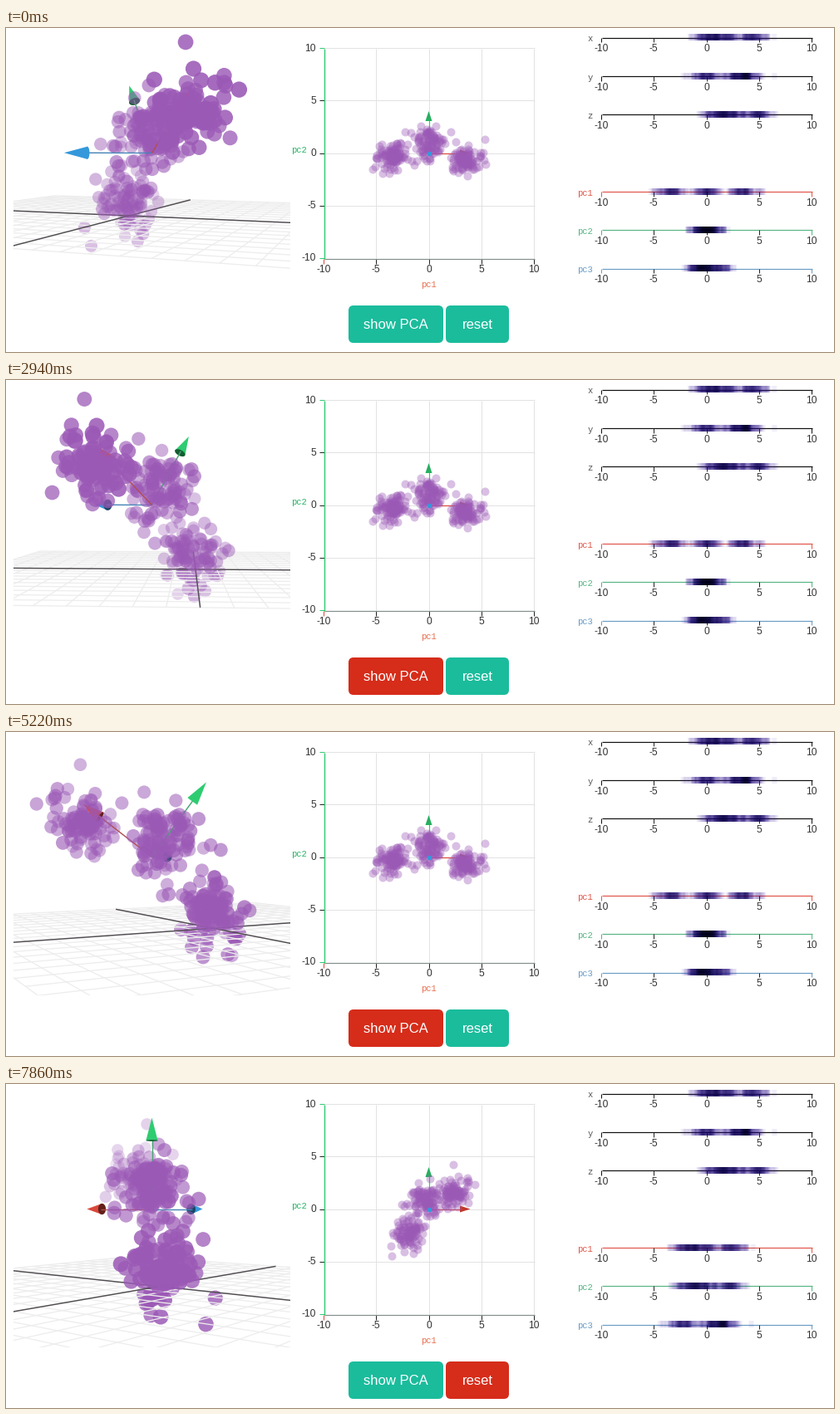
Write a matplotlib script that moves like this. It is 996 by 390 pixels and loops after 8 s.

```python
import numpy as np
import matplotlib.pyplot as plt
from matplotlib.animation import FuncAnimation
from matplotlib.collections import LineCollection
from matplotlib.colors import to_rgb
from matplotlib.patches import FancyBboxPatch, Polygon

W, H, DPI = 996, 390, 100
FRAMES, INTERVAL = 100, 80
PX = 72 / DPI
PURPLE = "#9b59b6"
RED, GREEN, BLUE = AXIS_COLOURS = "#d9483b", "#2ecc71", "#3498db"
TEAL, HOVER = "#1abc9c", "#d62c1a"

# Perspective view: eye level with the cloud's mean, orbiting around it
CX, CY, FOCAL, DIST = 175.5, 150.5, 687, 25
FLOOR = np.array([-1.92, -3.02, -1.93])
MEAN = np.array([2.0, 2.2, 2.7])


def orthonormal(basis):
    a = basis[0] / np.linalg.norm(basis[0])
    b = basis[1] - a * (a @ basis[1])
    b /= np.linalg.norm(b)
    return np.array([a, b, np.cross(a, b)])


PCA = orthonormal(np.array([[.595, .6, .535], [-.44, .805, -.4], [0, 0, 1]]))


def make_cloud(per_cluster=95):
    rng = np.random.default_rng(12)
    parts = []
    for centre in ([-3.5, -.3, 0], [0, .95, 0], [3.5, -.65, 0]):
        p = rng.normal(0, .74, (per_cluster, 3))
        parts.append(p - p.mean(axis=0) + centre)
    return np.vstack(parts) @ PCA


CLOUD = make_cloud()

fig = plt.figure(figsize=(W / DPI, H / DPI), dpi=DPI, facecolor="white")


def pixel_axes(x0, y0, x1, y1):
    ax = fig.add_axes([x0 / W, 1 - y1 / H, (x1 - x0) / W, (y1 - y0) / H])
    ax.set_xlim(x0, x1)
    ax.set_ylim(y1, y0)
    ax.autoscale(False)
    ax.axis("off")
    return ax


page = pixel_axes(0, 0, W, H)
view = pixel_axes(9, 0, 342, 317)


def line(ax, xs, ys, colour, width=1, z=2):
    return ax.plot(xs, ys, color=colour, lw=width * PX, zorder=z,
                   solid_capstyle="butt")[0]


def label(x, y, text, size=12, colour="#333333", family="Liberation Sans",
          ha="center"):
    return page.text(x, y, text, fontsize=size * PX, color=colour,
                     family=family, ha=ha, va="center", zorder=9)


def name_label(x, y, text, colour, ha="center"):
    label(x, y, text, 10.5, colour, "Liberation Mono", ha)


# ---- scatter plot -------------------------------------------------------
OX, OY, UNIT = 508.5, 150.5, 12.65


def draw_plot_frame():
    x0, x1, y0, y1 = 382.5, 635.5, 24.5, 277.5
    for v in (-10, -5, 0, 5, 10):
        gx, gy = OX + v * UNIT, OY - v * UNIT
        if v > -10:
            line(page, [gx, gx], [y0, y1], "#e2e2e2", z=1)
            line(page, [x0, x1], [gy, gy], "#e2e2e2", z=1)
        line(page, [gx, gx], [y1, y1 + 6], RED if v == -10 else "#222222")
        line(page, [x0 - 6, x0], [gy, gy],
             GREEN if abs(v) == 10 else "#222222")
        label(gx, 291.5, str(v))
        label(373, gy + .5, str(v), ha="right")
    line(page, [x0, x1], [y1, y1], "#83908a", 1.2)
    line(page, [x0, x0], [y0, y1], GREEN, 1.4)
    name_label(508.5, 308.5, "pc1", "#e8704f")
    name_label(352, 147.5, "pc2", "#27b768")
    line(page, [OX, OX], [OY, OY - 40], GREEN, 1.2, 3)
    line(page, [OX, OX + 40], [OY, OY], RED, 1.2, 3)
    page.add_patch(Polygon([(OX, 100), (OX - 4, 112), (OX + 4, 112)],
                           fc="#27ae60", lw=0, zorder=3))
    page.add_patch(Polygon([(558.5, OY), (546, OY - 4), (546, OY + 4)],
                           fc="#c0392b", lw=0, zorder=3))
    page.scatter([OX], [OY], s=(5.5 * PX) ** 2, color=BLUE, lw=0, zorder=5)


draw_plot_frame()
dots = page.scatter(*np.zeros((2, len(CLOUD))), s=(10 * PX) ** 2, color=PURPLE,
                    alpha=.38, lw=0, zorder=4)

# ---- density strips -----------------------------------------------------
SX, SC = 716.5, 842.5
STRIP_X = np.linspace(-10, 10, 254)


def density_rgba(values):
    gap = np.abs(STRIP_X[:, None] - values[None, :])
    count = np.clip((.32 - gap) / .16, 0, 1).sum(axis=1)
    rgb = np.exp(-count[:, None] * np.array([.062, .074, .030]))
    alpha = 1 - rgb.min(axis=1)
    safe = np.maximum(alpha, 1e-6)[:, None]
    ink = np.clip((rgb - 1 + safe) / safe, 0, 1)
    return np.column_stack([ink, alpha])[None]


def draw_strip(y, text, colour, text_colour, values):
    line(page, [SX, SX + 253], [y, y], colour, 1.2)
    for v in (-10, -5, 0, 5, 10):
        tx = SC + v * UNIT
        line(page, [tx, tx], [y, y + 5.5],
             colour if abs(v) == 10 else "#222222")
        label(tx, y + 14, str(v))
    name_label(706, y + 2, text, text_colour, "right")
    return page.imshow(density_rgba(values), aspect="auto", zorder=3,
                       extent=(716, 970, y + 4, y - 4),
                       interpolation="nearest")


for y, text, values in zip((11.5, 58, 104), "xyz", (CLOUD + MEAN).T):
    draw_strip(y, text, "#111111", "#555555", values)
strips = [draw_strip(y, text, colour, colour, CLOUD[:, 0])
          for y, text, colour in zip((197, 243, 289.5), ("pc1", "pc2", "pc3"),
                                     ("#e0574a", "#55b584", "#6a9cc4"))]


# ---- buttons ------------------------------------------------------------
def draw_button(x0, x1, text):
    box = FancyBboxPatch((x0, 334), x1 - x0, 45, fc=TEAL, lw=0, zorder=2,
                         boxstyle="round,pad=0,rounding_size=6")
    page.add_patch(box)
    label((x0 + x1) / 2, 357, text, 16.6, "white")
    return box


show_button = draw_button(412, 526, "show PCA")
reset_button = draw_button(529, 605, "reset")


# ---- 3D view ------------------------------------------------------------
def project(points, turn):
    x, y, z = np.asarray(points, float).T
    depth = DIST + x * np.cos(turn) - z * np.sin(turn)
    scale = FOCAL / depth
    side = x * np.sin(turn) + z * np.cos(turn)
    return np.column_stack([CX + scale * side, CY - scale * y]), depth


def floor_lines(values, turn):
    segments = []
    for v in values:
        for ends in ([(v, 0, -10), (v, 0, 10)], [(-10, 0, v), (10, 0, v)]):
            segments.append(project(np.array(ends) + FLOOR, turn)[0])
    return segments


def draw_balls(xy, depth, mask, z):
    if not mask.any():
        return
    rgba = np.ones((mask.sum(), 4))
    rgba[:, :3] = to_rgb(PURPLE)
    rgba[:, 3] = np.clip(.56 - .085 * (depth[mask] - DIST), .12, .93)
    view.scatter(*xy[mask].T, s=(408 / depth[mask] * PX) ** 2, c=rgba, lw=0,
                 zorder=z)


def draw_shaft(axis, colour, turn, z):
    xy, _ = project([axis * 0, axis * 3.1], turn)
    mix = .65 * np.array(to_rgb(colour)) + .35 * np.array([.4, .35, .45])
    line(view, *xy.T, mix, 1.4, z)


def draw_head(axis, colour, turn, z):
    helper = np.array([.31, .2, .93]) if abs(axis[1]) > .5 else np.array([0, 1, 0])
    u = np.cross(axis, helper)
    u /= np.linalg.norm(u)
    v = np.cross(axis, u)
    a = np.linspace(0, 2 * np.pi, 28, endpoint=False)[:, None]
    rim, rim_depth = project(axis * 3 + .26 * (np.cos(a) * u + np.sin(a) * v), turn)
    tip, tip_depth = project([axis * 4], turn)
    heading = tip[0] - rim.mean(axis=0)
    across = (rim - rim.mean(axis=0)) @ np.array([-heading[1], heading[0]])
    sides = [tip[0], rim[across.argmax()], rim[across.argmin()]]
    away = tip_depth[0] > rim_depth.mean()
    base = np.array(to_rgb(colour)) * (.45 if away else 1)
    cone = Polygon(sides, fc=colour, lw=0, zorder=z + (0 if away else .1))
    view.add_patch(cone)
    view.add_patch(Polygon(rim, fc=base, lw=0, zorder=z + .05))


def draw_view(basis, turn):
    for artist in [*view.collections, *view.lines, *view.patches]:
        artist.remove()
    xy, depth = project(CLOUD, turn)
    order = np.argsort(-depth)
    xy, depth = xy[order], depth[order]
    above = CLOUD[order, 1] > FLOOR[1]

    draw_balls(xy, depth, ~above, 1)
    grid = [v for v in range(-10, 11) if v]
    view.add_collection(LineCollection(floor_lines(grid, turn), lw=1.3 * PX,
                                       colors="#ededed", zorder=2))
    view.add_collection(LineCollection(floor_lines([0], turn), lw=1.5 * PX,
                                       colors="#524e52", zorder=2.5))

    # Slice the cloud by depth so arrows sit among the balls
    parts = []
    for axis, colour in zip(basis, AXIS_COLOURS):
        for reach, draw in ((1.5, draw_shaft), (3.5, draw_head)):
            part_depth = project([axis * reach], turn)[1][0]
            parts.append((part_depth, draw, axis, colour))
    parts.sort(key=lambda part: -part[0])
    far = np.inf
    for i, (near, draw, axis, colour) in enumerate(parts):
        draw_balls(xy, depth, above & (depth < far) & (depth >= near), 3 + 2 * i)
        draw(axis, colour, turn, 4 + 2 * i)
        far = near
    draw_balls(xy, depth, above & (depth < far), 20)


def ease(t):
    t = min(max(t, 0), 1)
    return 4 * t ** 3 if t < .5 else 1 - 4 * (1 - t) ** 3


def update(i):
    t = i * INTERVAL / 1000
    k = ease((t - 6.35) / 1.0)
    basis = orthonormal(PCA * (1 - k) + np.eye(3) * k)
    draw_view(basis, np.radians(111 + 25.2 * t))

    scores = CLOUD @ basis.T
    dots.set_offsets(np.column_stack([OX + UNIT * scores[:, 0],
                                      OY - UNIT * scores[:, 1]]))
    for strip, column in zip(strips, (0, 2, 1)):
        strip.set_data(density_rgba(scores[:, column]))
    show_button.set_facecolor(HOVER if 1.4 <= t < 5.75 else TEAL)
    reset_button.set_facecolor(HOVER if t >= 5.75 else TEAL)
    return []


animation = FuncAnimation(fig, update, frames=FRAMES, interval=INTERVAL,
                          init_func=lambda: [], repeat=True, repeat_delay=0)
plt.show()
```
